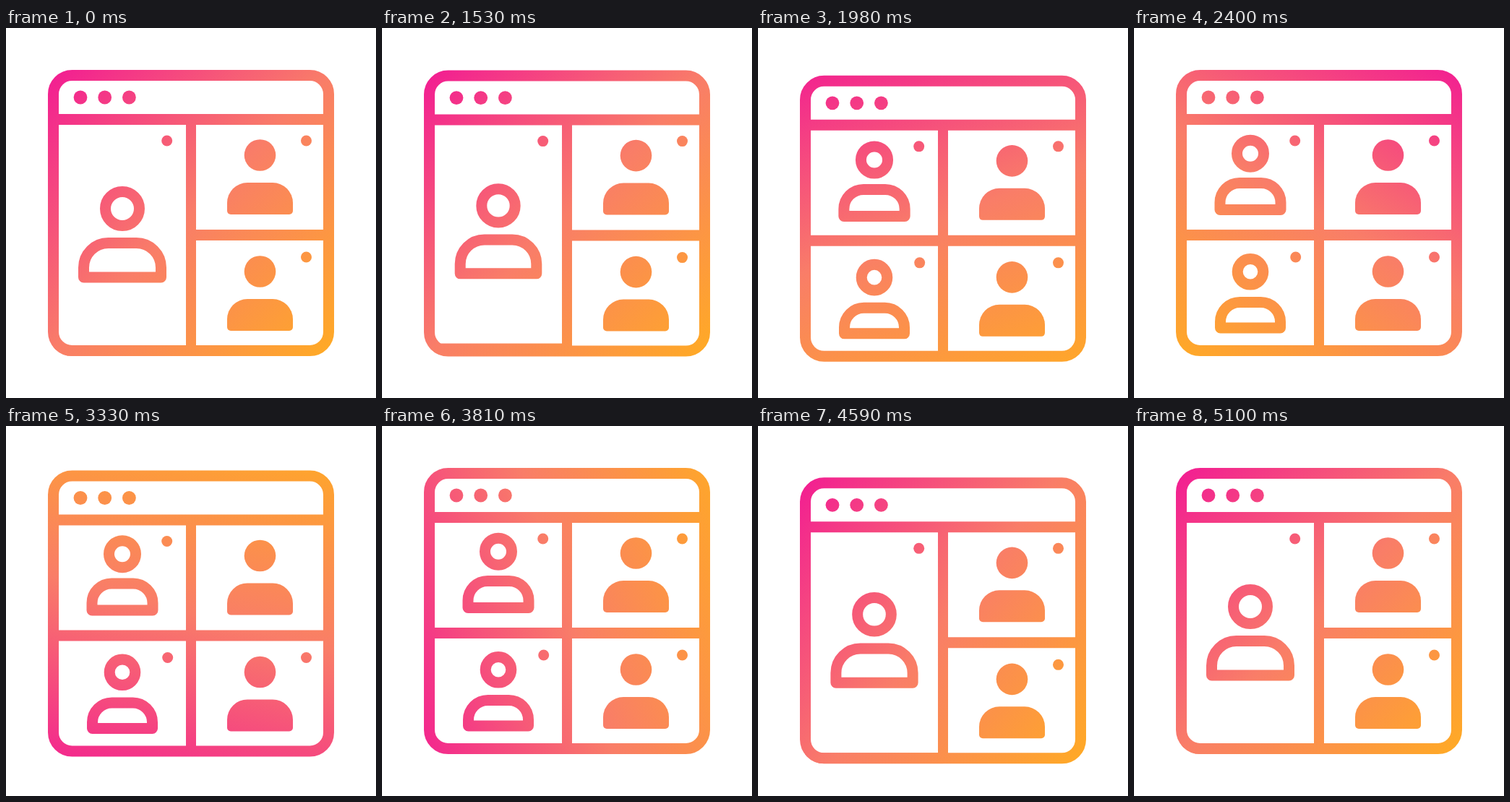
An HTML page with a canvas for the animation above (5.13 s loop, 512x512 px).

```html
<!DOCTYPE html>
<html lang="en">
<head>
<meta charset="utf-8">
<title>Video call layout</title>
<style>
  html, body { margin: 0; width: 100%; height: 100%; overflow: hidden; background: #fff; }
  canvas { display: block; width: 100%; height: 100%; }
</style>
</head>
<body>
<canvas id="stage" width="512" height="512"></canvas>
<script>
const ctx = document.getElementById('stage').getContext('2d');
const LOOP = 5130, STEP = 30, LINE = 15;
const SPLIT = 1500, MERGE = 4200;

const clamp = x => Math.min(1, Math.max(0, x));
const smooth = x => { x = clamp(x); return x * x * (3 - 2 * x); };
const lerp = (a, b, p) => a + (b - a) * p;
const between = (t, a, b) => t >= a && t < b;

// Critically damped approach from 0 to 1
const settle = ms => {
  const x = Math.max(0, ms) / 75;
  return 1 - (1 + x) * Math.exp(-x);
};
const bump = (t, start, rise, fall, height) =>
  height * (smooth((t - start) / rise) - smooth((t - start - rise) / fall));

// Gradient direction in degrees: [time, angle, speed per ms]
const TURN = [
  [1500, 45, 0], [2400, 120, 0.148], [3330, 285, 0.138],
  [4320, 385, 0.068], [5100, 405, 0]
];
function gradientAngle(t) {
  if (t <= TURN[0][0]) return 45;
  for (let i = 1; i < TURN.length; i++) {
    const [t0, a0, v0] = TURN[i - 1], [t1, a1, v1] = TURN[i];
    if (t > t1) continue;
    const d = t1 - t0, x = (t - t0) / d, s = smooth(x);
    return lerp(a0, a1, s) + d * (v0 * x * (1 - x) ** 2 - v1 * x * x * (1 - x));
  }
  return 45;
}

function paint(angle) {
  const a = angle * Math.PI / 180, dx = 275 * Math.cos(a), dy = 275 * Math.sin(a);
  const g = ctx.createLinearGradient(256 - dx, 256 - dy, 256 + dx, 256 + dy);
  g.addColorStop(0, '#f21d92');
  g.addColorStop(0.5, '#f97d68');
  g.addColorStop(1, '#ffaa25');
  return g;
}

function disc(x, y, r) {
  ctx.beginPath();
  ctx.arc(x, y, r, 0, Math.PI * 2);
  ctx.fill();
}

function line(x1, y1, x2, y2, width = LINE) {
  ctx.lineWidth = width;
  ctx.beginPath();
  ctx.moveTo(x1, y1);
  ctx.lineTo(x2, y2);
  ctx.stroke();
}

function box(x, y, w, h, radii) {
  ctx.beginPath();
  ctx.roundRect(x, y, w, h, radii);
}

function solidPerson(y) {
  disc(351.5, y, 21.8);
  box(306, y + 38, 91, 44, [28, 28, 5, 5]);
  ctx.fill();
}

function outlinePerson(x, headY, headR, halfWidth, top, bottom, corner) {
  ctx.lineWidth = LINE;
  ctx.beginPath();
  ctx.arc(x, headY, headR, 0, Math.PI * 2);
  ctx.stroke();
  box(x - halfWidth, top, halfWidth * 2, bottom - top, [corner, corner, 0, 0]);
  ctx.stroke();
}

function draw(t) {
  const drop = bump(t, SPLIT, 270, 400, 17)
             + bump(t, 3165, 260, 240, 5)
             + bump(t, MERGE, 270, 400, 17);
  const split = smooth((t - SPLIT) / 370) - smooth((t - MERGE) / 370);
  const shrink = settle(t - SPLIT) - settle(t - MERGE);
  const barY = lerp(446.5, 286.5, split);
  const shift = barY - 286.5;

  ctx.setTransform(1, 0, 0, 1, 0, 0);
  ctx.fillStyle = '#fff';
  ctx.fillRect(0, 0, 512, 512);
  ctx.translate(0, drop);
  ctx.fillStyle = ctx.strokeStyle = paint(gradientAngle(t));
  ctx.lineJoin = 'round';

  // Window
  ctx.lineWidth = LINE;
  box(65.5, 65.5, 381, 381, 26);
  ctx.stroke();
  line(65, 126.5, 447, 126.5);
  line(256, 126.5, 256, 446, 14);
  line(256, 286.5, 447, 286.5);
  for (const x of [103, 136.7, 170.4]) disc(x, 96, 9.4);

  // Right column
  solidPerson(176);
  solidPerson(337);
  if (!between(t, 3180, 3480)) disc(415.5, 156, 7.5);
  disc(415.5, 317, 7.5);

  // Left column
  if (!between(t, 4200, 4500)) disc(222.7, 156, 7.5);
  outlinePerson(161, lerp(250, 173.7, shrink), lerp(23.5, 18.5, shrink),
    lerp(53.5, 42, shrink), lerp(297.5, 214.5, shrink),
    lerp(345, 251.5, shrink), lerp(34, 27, shrink));

  ctx.save();
  box(58, 58, 396, 396, 33.5);
  ctx.clip();
  line(65, barY, 256, barY);
  if (split > 0) {
    ctx.translate(0, shift);
    outlinePerson(161, 337.3, 17.8, 41.5, 379.5, 415, 27);
    if (t >= 1950) disc(223.7, 317, 7.5);
  }
  ctx.restore();
}

const start = performance.now();
function tick() {
  const t = (performance.now() - start) % LOOP;
  draw(Math.floor(t / STEP) * STEP);
  requestAnimationFrame(tick);
}
tick();
</script>
</body>
</html>
```
